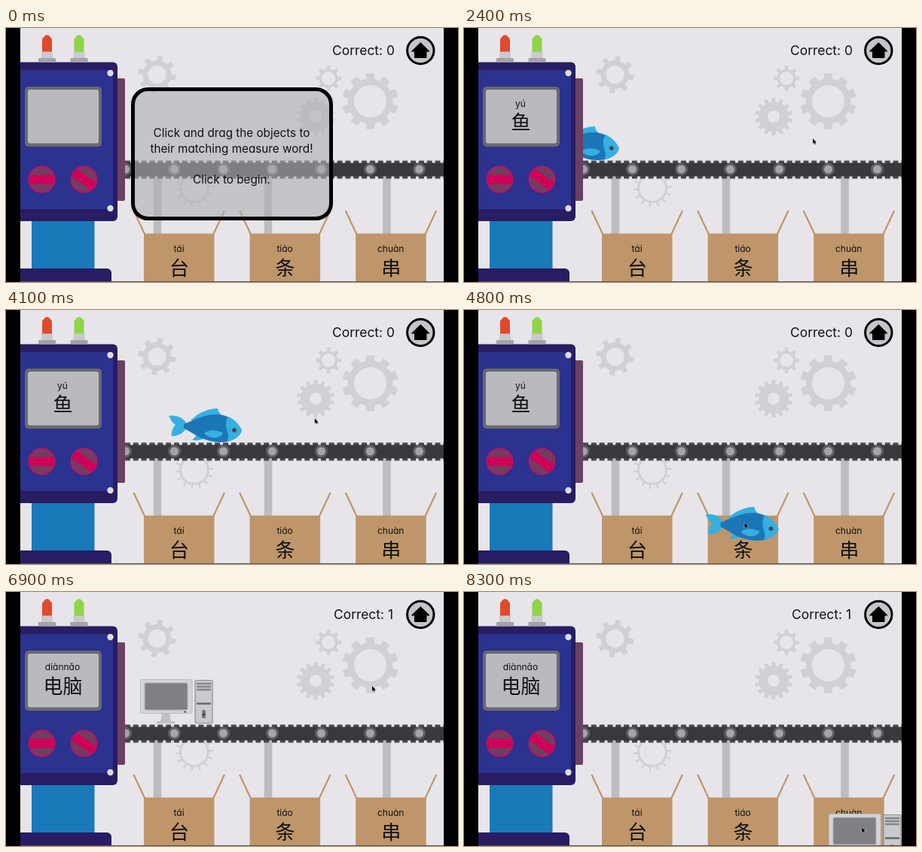
These frames come from a looping animation (600x338 px, 8400 ms). An HTML page:

```html
<!DOCTYPE html>
<html lang="en">
<head>
<meta charset="utf-8">
<title>Measure word game</title>
<style>
  html, body { margin: 0; width: 100%; height: 100%; overflow: hidden; background: #000; }
  svg { display: block; width: 600px; height: 338px; }
  text { font-family: Inter, Lato, sans-serif; font-feature-settings: "cv11"; text-anchor: middle; fill: #111; }
  .pinyin { font-size: 12px; }
  .hanzi { font: 500 26px "Noto Sans CJK SC", "Noto Sans CJK", sans-serif; }
  .score { font-size: 17.4px; }
  .note { font-size: 15.25px; }
</style>
</head>
<body>
<svg viewBox="0 0 600 338">
  <defs>
    <clipPath id="stage"><rect x="19" width="562" height="338"/></clipPath>
  </defs>
  <g clip-path="url(#stage)">
    <rect x="19" width="562" height="338" fill="#e7e5ea"/>
    <g id="gears" fill="#d0d0d5" fill-rule="evenodd"></g>

    <path d="M201 198V274M348 198V274M505.500 198V274" stroke="#bcbdc1" stroke-width="10.500"/>

    <g id="belt">
      <path d="M158 188.500H581" stroke="#48474c" stroke-width="24" stroke-dasharray="7 3.830"/>
      <rect x="158" y="179.500" width="423" height="18" fill="#39383d"/>
    </g>

    <g id="boxes"></g>

    <g id="fish">
      <path d="M24 20C18 11 8 8 0 10C3 16 5 19 9 22C5 26 3 31 4 37C13 37 20 32 25 25Z" fill="#35b0e0"/>
      <path d="M29 16C40 5 53 0 65 0C65 3 67 6 70 9L50 16Z" fill="#35b0e0"/>
      <path d="M37 33C36 37 34 40 31 42C38 43 44 42 49 39Z" fill="#35b0e0"/>
      <path d="M20 21C36 14 48 8 63 8C80 8 91 18 97 29C94 39 83 45 68 45C49 45 35 35 20 26Z" fill="#1b76b8"/>
      <path d="M79 11C88 15 94 22 97 29C95 37 87 42 77 44C84 35 70 25 79 11Z" fill="#35b0e0"/>
      <path d="M47 33C53 28 64 28 72 33C67 41 54 41 47 33Z" fill="#35b0e0"/>
      <circle cx="87" cy="29" r="2.800" fill="#49404d"/>
    </g>

    <g id="computer">
      <path d="M29 45H39L41 56H46V59H22V56H27Z" fill="#bfc0c4"/>
      <rect x=".5" y=".5" width="68.500" height="45" rx="1.500" fill="#d3d4d7" stroke="#bbbcc0"/>
      <rect x="6" y="5" width="57" height="36" rx="2" fill="#7e8086" stroke="#b1b2b6"/>
      <path d="M58 43.500H61" stroke="#333" stroke-width="1.500"/>
      <rect x="73" y="1.500" width="23" height="57" rx="1.500" fill="#c9cacd" stroke="#8d8e93" stroke-width="1.200"/>
      <path d="M75 6H94M75 10H94M75 14H94" stroke="#85868b" stroke-width="2.400"/>
      <path d="M75 32.500H94" stroke="#66676c" stroke-width="2.500"/>
      <rect x="82" y="41" width="5" height="11" rx="1.500" fill="#77787d"/>
      <circle cx="84.500" cy="47" r="1.200" fill="#222"/>
    </g>

    <g id="machine">
      <rect x="140" y="67" width="18" height="163" rx="2" fill="#6b4163"/>
      <rect x="34" y="250" width="83.500" height="75" fill="#1a79b8"/>
      <rect x="9" y="320" width="131" height="30" rx="6" fill="#281c62"/>
      <rect x="9" y="45.500" width="139" height="211.500" rx="6" fill="#281c62"/>
      <rect x="19" y="56" width="123" height="185" fill="#2b328f"/>
      <circle cx="138.500" cy="60" r="4.200" fill="#dddde3"/>
      <circle cx="138.500" cy="240" r="4.200" fill="#dddde3"/>
      <rect x="25" y="78" width="102" height="80" rx="5" fill="#69696e"/>
      <rect x="29" y="82" width="94" height="71.500" rx="3" fill="#b9babe"/>
    </g>

    <g id="fishWord">
      <text class="pinyin" x="75" y="105">yú</text>
      <text class="hanzi" x="75.500" y="135">鱼</text>
    </g>
    <g id="computerWord">
      <text class="pinyin" x="75" y="104">diànnǎo</text>
      <text class="hanzi" x="75.500" y="135">电脑</text>
    </g>

    <text id="score0" class="score" x="474.500" y="36">Correct: 0</text>
    <text id="score1" class="score" x="474.500" y="36">Correct: 1</text>
    <circle cx="550.300" cy="30" r="17.700" fill="#c5c5c9" stroke="#000" stroke-width="3"/>
    <path d="M550.300 19.500L562 31H558V39.500H542.500V31H538.500Z" stroke="#000" stroke-linejoin="round"/>

    <g id="modal">
      <rect x="168.500" y="81.500" width="263" height="172" rx="20" fill="rgba(173,174,178,.6)" stroke="#000" stroke-width="5"/>
      <text class="note" x="299.500" y="145">Click and drag the objects to</text>
      <text class="note" x="299.500" y="165.500">their matching measure word!</text>
      <text class="note" x="299.500" y="206.500">Click to begin.</text>
    </g>

    <path d="M19 337.500H581" stroke="#555"/>
    <path id="cursor" d="M0 0V7L1.700 5.600L2.800 8L4 7.500L3 5.200H5Z" fill="#000" stroke="#fff" stroke-width=".8" paint-order="stroke"/>
  </g>
</svg>
<script>
const LOOP = 8400, START = 1450, DROP = 4850, NEXT = 4900;
const $ = id => document.getElementById(id);
const add = (id, markup) => $(id).insertAdjacentHTML('beforeend', markup);
const circle = (x, y, r) => `M${x - r} ${y}a${r} ${r} 0 1 0 ${2 * r} 0a${r} ${r} 0 1 0 ${-2 * r} 0Z`;

function gear(x, y, outer, body, hole, teeth, width, turn) {
  let tips = '';
  for (let i = 0; i < teeth; i++) {
    tips += `<rect x="${-width / 2}" y="${-outer}" width="${width}" height="${outer - body + 2}" rx=".6"
      transform="translate(${x} ${y}) rotate(${turn + i * 360 / teeth})"/>`;
  }
  add('gears', `<path d="${circle(x, y, body)}${circle(x, y, hole)}"/>${tips}`);
}
gear(200.5, 62, 25, 19, 12, 8, 7, 10);
gear(428, 67, 17, 12.5, 9, 8, 4.5, 0);
gear(411, 118, 25, 20, 8, 14, 5, 0);
gear(483.5, 97.5, 37, 30, 21.5, 10, 11, 0);
gear(250, 213, 25.5, 20, 17, 14, 2.5, 8);

for (let x = 158.5; x < 581; x += 65) {
  add('belt', `<circle cx="${x}" cy="188" r="8.500" fill="#5f5e63"/><circle cx="${x}" cy="188" r="5.500" fill="#a4a4aa"/>`);
}

[['tái', '台'], ['tiáo', '条'], ['chuàn', '串']].forEach(([pinyin, hanzi], i) => add('boxes',
  `<g transform="translate(${183 + i * 140.6} 274)">
    <path d="M1.500 1L-13.500 -31M92 1L107 -31" stroke="#bf966a" stroke-width="2.200"/>
    <rect y="-.5" width="93.500" height="66" fill="#bf966a"/>
    <text class="pinyin" x="46.500" y="24">${pinyin}</text>
    <text class="hanzi" x="47" y="55">${hanzi}</text>
  </g>`));

[[47.5, 0], [103.5, 35]].forEach(([x, turn]) => add('machine',
  `<g transform="translate(${x} 201.500) rotate(${turn})">
    <circle r="17" fill="#703e5f" stroke="#bd1460" stroke-width="2"/>
    <rect x="-16.500" y="-6" width="33" height="12" fill="#d00059"/>
  </g>`));

[[54.5, '#e04a2c'], [97, '#8fd545']].forEach(([x, color]) => add('machine',
  `<g transform="translate(${x} 0)">
    <path d="M-6.500 33V14.500L-2.500 10Q0 8.500 2.500 10L6.500 14.500V33Z" fill="${color}"/>
    <rect x="-7.500" y="31.500" width="15" height="10" fill="#c9c9ce"/>
    <rect x="-11.500" y="40" width="23" height="5.500" rx="1" fill="#a2a2a8"/>
  </g>`));

const play = (id, frames) => $(id).animate(frames, { duration: LOOP, iterations: Infinity });

function show(id, from, to) {
  const steps = [[0, from ? 0 : 1], [from, 1], [to, 0], [LOOP, to < LOOP ? 0 : 1]];
  play(id, steps.map(([t, opacity]) => ({ offset: t / LOOP, opacity, easing: 'step-end' })));
}

// Each step: time, x, y and optionally the easing towards the next step.
function move(id, steps) {
  const [first, last] = [steps[0], steps[steps.length - 1]];
  const path = [[0, first[1], first[2]], ...steps, [LOOP, last[1], last[2]]];
  play(id, path.map(([t, x, y, easing = 'linear']) =>
    ({ offset: t / LOOP, transform: `translate(${x}px, ${y}px)`, easing })));
}

const soft = 'ease-in-out';
show('modal', 0, START);
show('fish', START, DROP);
show('fishWord', START, NEXT);
show('computer', NEXT, LOOP);
show('computerWord', NEXT, LOOP);
show('score0', 0, DROP);
show('score1', DROP, LOOP);

move('fish', [[START, 49, 131], [4450, 238, 131, soft], [DROP, 323, 266]]);
move('computer', [[NEXT, 53.8, 116], [7400, 209, 116, soft], [8300, 484, 295]]);
move('cursor', [
  [600, 600, 345, soft], [1150, 404, 154], [1500, 404, 154, soft], [2200, 463, 147],
  [3800, 463, 147], [4100, 410, 144], [4450, 290, 152, soft], [DROP, 375, 287, soft],
  [5400, 486, 125], [6950, 486, 125, soft], [7400, 253, 134, soft], [8300, 528, 313]
]);
</script>
</body>
</html>
```
